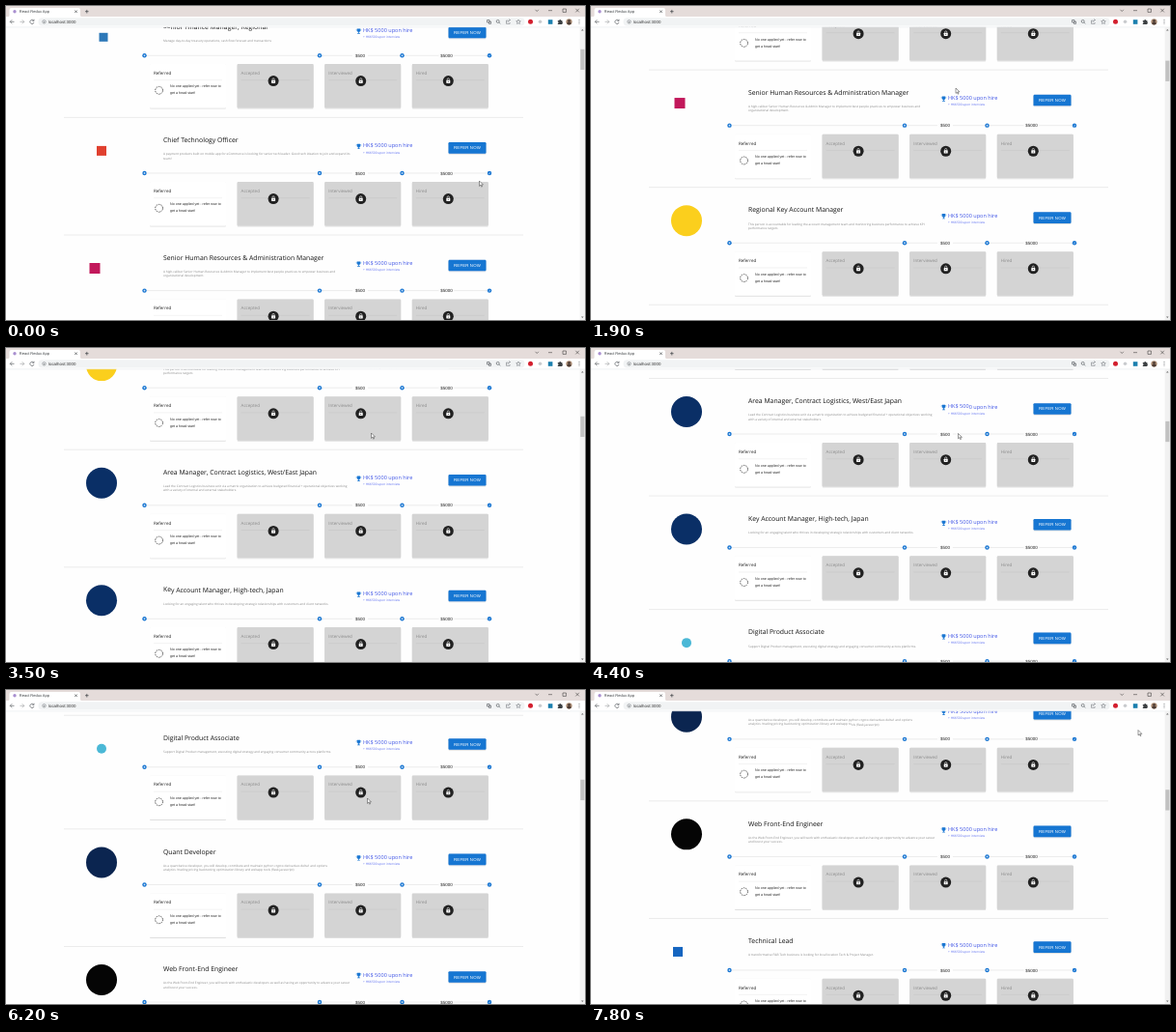
An HTML page for the animation above (8.3 s loop, 600 by 325 pixels).

```html
<!DOCTYPE html>
<html lang="en">
<head>
<meta charset="utf-8">
<title>React Redux App</title>
<style>
  html, body { margin: 0; width: 100%; height: 100%; overflow: hidden; background: #fff; }
  svg { display: block; width: 600px; height: 325px; text-rendering: geometricPrecision; }
  text { font-family: "Open Sans", sans-serif; white-space: pre; }
  .ui { font-family: "Liberation Sans", Arial, sans-serif; }
  .icon { fill: none; stroke: #5f6368; stroke-width: .7; }
</style>
</head>
<body>
<svg id="stage" viewBox="0 0 600 325" xmlns="http://www.w3.org/2000/svg">
  <defs>
    <filter id="soft" x="-10%" y="-10%" width="120%" height="130%">
      <feDropShadow dx="0" dy=".5" stdDeviation=".5" flood-opacity=".24"/>
    </filter>
    <g id="lock">
      <circle r="5.5" fill="#212121"/>
      <rect x="-2" y="-.9" width="4" height="3.2" rx=".4" fill="#fff"/>
      <path d="M-1.1-.9v-.8a1.1 1.1 0 0 1 2.2 0v.8" fill="none" stroke="#fff" stroke-width=".6"/>
      <circle cy=".7" r=".5" fill="#212121"/>
    </g>
    <g id="plus">
      <circle r="2.2" fill="#1976d2"/>
      <path d="M-.9 0h1.800M0-.9v1.800" stroke="#fff" stroke-width=".6"/>
    </g>
    <g id="check">
      <circle r="2.2" fill="#1976d2"/>
      <path d="M-1 0l.7.7L1-.6" fill="none" stroke="#fff" stroke-width=".5"/>
    </g>
    <g id="trophy" fill="#1976d2">
      <path d="M-1.5-2.6h3v2.2a1.5 1.5 0 0 1-3 0zM-.4 1h.8v1h1v.7h-2.8v-.7h1z"/>
      <path d="M-1.4-1.9h-.9c0 1.3.2 1.8 1.1 2M1.4-1.9h.9c0 1.3-.2 1.8-1.1 2" fill="none" stroke="#1976d2" stroke-width=".5"/>
    </g>
  </defs>
  <rect width="600" height="325" fill="#fefefe"/>
  <g id="page"></g>
  <g id="chrome"></g>
  <path id="cursor" d="M0 0v5.400l1.300-1.200.9 2 .8-.4-.9-1.900h1.800z" fill="#fff" stroke="#222" stroke-width=".45"/>
</svg>
<script>
const LOOP = 8300, STEP = 100, NOTCH = 31.25, START = 2.2;

// logo: [shape, colour, size, x]
const jobs = [
  { title: 'Senior Finance Manager, Regional', logo: ['square', '#2d78b8', 9, 101],
    text: ['Manage day-to-day treasury operations, cash flow forecast and transactions'] },
  { title: 'Chief Technology Officer', logo: ['square', '#e0402f', 10, 99],
    text: ['A payment products built on mobile app for eCommerce is looking for senior tech leader. Good tech ideation to join and expand its', 'team!'] },
  { title: 'Senior Human Resources & Administration Manager', logo: ['square', '#c2185b', 11, 92],
    text: ['A high-caliber Senior Human Resources & Admin Manager to implement best people practices to empower business and', 'organizational development.'] },
  { title: 'Regional Key Account Manager', logo: ['circle', '#fbcf1d', 32, 99],
    text: ['This person is accountable for leading the account management team and monitoring business performance to achieve KPI', 'performance targets'] },
  { title: 'Area Manager, Contract Logistics, West/East Japan', logo: ['circle', '#0a2f66', 32, 99],
    text: ['Lead the Contract Logistics business unit via a matrix organization to achieve budgeted financial + operational objectives working', 'with a variety of internal and external stakeholders.'] },
  { title: 'Key Account Manager, High-tech, Japan', logo: ['circle', '#0a2f66', 32, 99],
    text: ['Looking for an engaging talent who thrives in developing strategic relationships with customers and client networks.'] },
  { title: 'Digital Product Associate', logo: ['circle', '#4bb8d6', 10, 99],
    text: ['Support Digital Product management, executing digital strategy and engaging consumer community across platforms.'] },
  { title: 'Quant Developer', logo: ['circle', '#0b2550', 32, 99],
    text: ['As a quantitative developer, you will develop, contribute and maintain python crypto derivatives delta1 and options', 'analytics /trading pricing backtesting optimization library and webapp tools (flask,javascript)'] },
  { title: 'Web Front-End Engineer', logo: ['circle', '#050505', 32, 99],
    text: ['As the Web Front-End Engineer, you will work with enthusiastic developers as well as having an opportunity to advance your career', 'and boost your success.'] },
  { title: 'Technical Lead', logo: ['square', '#1565c0', 10, 90],
    text: ['A transformative F&B Tech business is looking for local location Tech & Project Manager.'] }
];

const esc = s => s.replace(/&/g, '&amp;');
// Laid out large and scaled down; the tiny turn keeps small glyphs unhinted.
const text = (x, y, size, fill, str, extra = '') =>
  `<text transform="translate(${x} ${y + size * .35}) rotate(.02) scale(.1)" font-size="${size * 10}" fill="${fill}" ${extra}>${esc(str)}</text>`;
const rect = (x, y, w, h, fill, extra = '') =>
  `<rect x="${x}" y="${y}" width="${w}" height="${h}" fill="${fill}" ${extra}/>`;
const dot = (x, y, r, fill) => `<circle cx="${x}" cy="${y}" r="${r}" fill="${fill}"/>`;
const use = (id, x, y) => `<use href="#${id}" x="${x}" y="${y}"/>`;
const hline = (x1, x2, y, color, w = .5) =>
  `<path d="M${x1} ${y}H${x2}" stroke="${color}" stroke-width="${w}"/>`;
const icon = (d, extra = '') => `<path class="icon" d="${d}" ${extra}/>`;
const UI = 'class="ui"', MID = 'class="ui" text-anchor="middle"';

function logo([shape, color, size, x]) {
  const r = size / 2;
  return shape === 'circle' ? dot(x, 34.5, r, color) : rect(x - r, 34.5 - r, size, size, color);
}

function card(label, i, y) {
  const x = 149 + i * 90.6, open = i === 0;
  const out = rect(x, y, 79, 45.5, open ? '#fff' : '#d4d4d4', 'rx="1" filter="url(#soft)"')
    + text(x + 4, y + 9.3, 4.5, open ? '#222' : '#8a8a8a', label)
    + hline(x + 4, x + 75, y + 16.7, open ? '#e6e6e6' : '#c2c2c2');
  if (!open) return out + use('lock', x + 37.5, y + 17.6);
  return out
    + `<circle cx="${x + 9.6}" cy="${y + 27.3}" r="3.9" fill="none" stroke="#222" stroke-width=".75" stroke-dasharray="1.5 .95"/>`
    + text(x + 21, y + 23.2, 3.64, '#222', 'No one applied yet - refer now to', UI)
    + text(x + 21, y + 30.2, 3.64, '#222', 'get a head start!', UI);
}

function row(job, top) {
  const tall = job.text.length > 1;
  const btn = tall ? 31.5 : 29.7, rail = tall ? 57.6 : 53.5, cards = tall ? 66.6 : 62.2;
  return `<g transform="translate(0 ${top})">`
    + hline(60, 536, 0, '#dedede', .6)
    + logo(job.logo)
    + text(163, 23.3, 6.85, '#111', job.title)
    + job.text.map((s, i) => text(163, 37.8 + i * 4.3, 3.18, '#888', s)).join('')
    + use('trophy', 365.5, btn - 1.5)
    + text(370, btn - 2.4, 5.55, '#3f55e6', 'HK$ 5000 upon hire')
    + text(370, btn + 4.5, 3.25, '#5a6cf0', '+ HK$500 upon interview')
    + rect(458.5, btn - 5.8, 39, 11.6, '#1976d2', 'rx="1.2" filter="url(#soft)"')
    + text(478, btn, 4.375, '#fff', 'REFER NOW', MID + ' letter-spacing="1.25"')
    + hline(143, 501, rail, '#d9d9d9')
    + [143.5, 325, 410.5].map(x => use('plus', x, rail)).join('')
    + use('check', 501, rail)
    + [[366.9, '$500'], [456.4, '$5000']].map(([x, s]) =>
        rect(x - 8, rail - 2.5, 16, 5, '#fefefe') + text(x, rail, 4.5, '#222', s, MID)).join('')
    + ['Referred', 'Accepted', 'Interviewed', 'Hired'].map((s, i) => card(s, i, cards)).join('')
    + '</g>';
}

const page = document.getElementById('page');
let rowTop = 0;
page.innerHTML = jobs.map(job => {
  const out = row(job, rowTop);
  rowTop += job.text.length > 1 ? 121.6 : 117.6;
  return out;
}).join('');

document.getElementById('chrome').innerHTML =
  rect(0, 0, 600, 11, '#e5dcda')
  + '<path d="M2 11q1.5 0 1.5-1.5V4q0-2 2-2H75q2 0 2 2v5.5Q77 11 78.5 11z" fill="#fff"/>'
  + dot(9, 5.8, 1.7, '#a98fd0')
  + text(13.8, 5.7, 4, '#3c4043', 'React Redux App', UI)
  + icon('M71.3 4.5l2.4 2.4m0-2.4l-2.4 2.4M82 5.7h3.6M83.8 3.9v3.6', 'style="stroke:#3c4043"')
  + icon('M548.5 3.8l1.7 1.7 1.7-1.7M562 4.7h4M577 3h3.4v3.4H577zM590.3 2.8l3.6 3.6m0-3.6l-3.6 3.6', 'style="stroke:#222;stroke-width:.5"')
  + rect(0, 11, 600, 10.8, '#fff')
  + hline(0, 600, 21.9, '#dadce0', .4)
  + icon('M8.5 16.3H4.3M6.2 14.3l-2 2 2 2')
  + icon('M14.5 16.3h4.2M16.8 14.3l2 2-2 2', 'opacity=".55"')
  + icon('M28.7 15.2a2.1 2.1 0 1 0 .3 1.7M29 13.7v1.7h-1.7')
  + rect(33.5, 12.3, 504, 8.2, '#f1f3f4', 'rx="4.1"')
  + '<circle class="icon" cx="39.5" cy="16.3" r="1.7" style="stroke-width:.5"/>' + icon('M39.5 16v1.2')
  + text(44, 16.2, 4.4, '#333', 'localhost:3000', UI)
  + icon('M498.5 14.5h2.5v2.5h-2.5zM500.5 16h2v2.4h-2z')
  + '<circle class="icon" cx="509.7" cy="15.9" r="1.5"/>' + icon('M510.8 17l1.4 1.4')
  + icon('M520 15h-1.5v3.3h3.6V17M520 16.7q.2-2 2.4-2.2m-1-1l1.1 1-1.1 1', 'style="stroke-width:.5"')
  + icon('M531 14l.7 1.5 1.6.2-1.2 1.1.3 1.6-1.4-.8-1.4.8.3-1.6-1.2-1.1 1.6-.2z', 'style="stroke-width:.5"')
  + dot(543.5, 16.3, 2.5, '#d3202f')
  + dot(553.5, 16.3, 1.8, '#c9cbce')
  + rect(561.8, 14.2, 4.6, 4.6, '#1b7fae')
  + '<path d="M571.8 15h1.5a.9.9 0 0 1 1.8 0h1.3v1.4a.9.9 0 0 1 0 1.7v1h-4.6v-1.2a.8.8 0 0 0 0-1.6z" fill="#3c4043"/>'
  + dot(583.5, 16.3, 3.1, '#a98a72')
  + '<path d="M581.3 18.5a2.2 2.2 0 0 1 4.4 0a3.1 3.1 0 0 1-4.4 0" fill="#4a3a33"/>' + dot(583.5, 15.3, 1.2, '#4a3a33')
  + [14.5, 16.3, 18.1].map(y => dot(594, y, .5, '#5f6368')).join('')
  + rect(594.7, 22.1, 5.3, 303, '#f1f1f1')
  + '<path d="M596 25.6l1.3-1.5 1.3 1.5zM596 321.6l1.3 1.5 1.3-1.5z" fill="#6a6a6a"/>'
  + rect(595.3, 0, 4.1, 21.3, '#c1c1c1', 'id="thumb"');

// [ms, wheel notches]
const scroll = [[1100, 0], [1900, 5.47], [2000, 6], [2300, 6], [3500, 12], [3900, 12],
  [4400, 14.36], [5200, 18], [5500, 19], [5600, 19], [6200, 22.18], [7500, 27]];
// [ms, x, y]
const pointer = [[300, 490.5, 181], [800, 378, 85], [2300, 378, 85], [3500, 378.5, 88],
  [4400, 380.5, 88.5], [5200, 380.5, 96.5], [6200, 374.5, 112], [7300, 374.5, 112], [7800, 567, 41.5]];

function at(track, t) {
  if (t <= track[0][0]) return track[0].slice(1);
  const i = track.findIndex(k => k[0] > t);
  if (i < 0) return track[track.length - 1].slice(1);
  const [a, b] = [track[i - 1], track[i]], p = (t - a[0]) / (b[0] - a[0]);
  return a.slice(1).map((v, j) => v + (b[j + 1] - v) * p);
}

const thumb = document.getElementById('thumb');
const cursor = document.getElementById('cursor');

function draw() {
  const t = Math.floor(performance.now() % LOOP / STEP) * STEP;
  const y = START + at(scroll, t)[0] * NOTCH;
  page.setAttribute('transform', `translate(0 ${-y})`);
  thumb.setAttribute('y', 44.6 + y * .0693);
  cursor.setAttribute('transform', `translate(${at(pointer, t)})`);
  requestAnimationFrame(draw);
}
draw();
</script>
</body>
</html>
```
